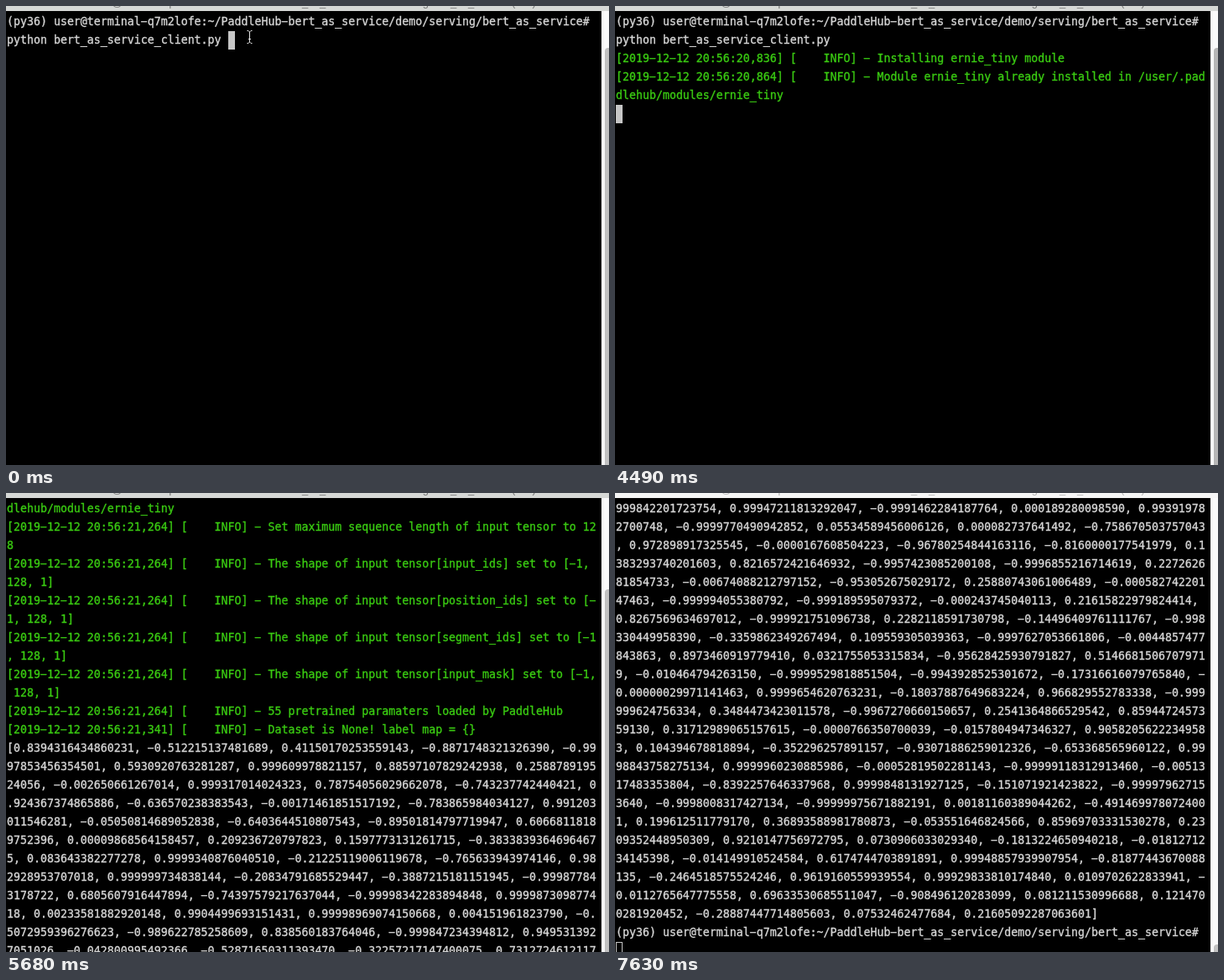
An HTML page that plays this animation: 719 px wide and 548 px high, repeating every 7.73 s.

```html
<!DOCTYPE html>
<html lang="en">
<head>
<meta charset="utf-8">
<title>Terminal session</title>
<style>
html, body { margin: 0; width: 100%; height: 100%; overflow: hidden; background: #000; }
#stage { position: absolute; left: 0; top: 0; width: 719px; height: 548px; overflow: hidden; background: #000; }
#stage > * { position: absolute; }
#view { left: 1px; top: 8px; width: 709px; height: 540px; overflow: hidden; }
pre {
  position: absolute; left: 0; top: 0; margin: 0; overflow: hidden; color: #d6d6d6;
  font: 13.289px/22px "DejaVu Sans Mono", "Liberation Mono", monospace;
  -webkit-text-stroke: .35px currentColor; font-variant-ligatures: none;
}
pre b { font-weight: normal; color: #3acb12; }
#cursor { width: 8px; height: 22px; box-sizing: border-box; background: #c6c6c6; border: 1px solid #c6c6c6; }
#cursor.hollow { background: none; }
#bar { left: 0; top: 0; width: 719px; height: 6px; overflow: hidden; background: #d6d8d6; color: #777; }
#bar.idle { background: #f6f6f6; color: #b5b5b5; }
#bar span { position: absolute; left: 101px; top: -12px; white-space: pre; font: 13px/15px "Liberation Sans", Arial, sans-serif; }
#track { left: 710px; top: 6px; width: 9px; height: 542px; background: #fafafa; }
#thumb { left: 714px; width: 8px; height: 560px; border-radius: 4px; background: #c1c1c1; }
#beam, #arrow { left: 0; top: 0; overflow: visible; }
</style>
</head>
<body>
<div id="stage">
  <div id="view">
<pre id="start">
(py36) user@terminal-q7m2lofe:~/PaddleHub-bert_as_service/demo/serving/bert_as_service#
python bert_as_service_client.py
<b id="log"></b>
</pre>
<pre id="end"></pre>
  </div>
  <div id="cursor"></div>
  <div id="track"></div>
  <div id="thumb"></div>
  <div id="bar"><span>user@terminal-q7m2lofe: ~/PaddleHub-bert_as_service/demo/serving/bert_as_service (ssh)</span></div>
  <svg id="beam" width="7" height="16" fill="none" stroke="#e4e4e4" stroke-width="1">
    <path d="M.5.5H2L3.5 2 5 .5H6.5M3.5 2V14M.5 15.5H2L3.5 14 5 15.5H6.5M2 10.5H5"/>
  </svg>
  <svg id="arrow" width="13" height="19">
    <path d="M.5 1V16L4 12.7 6.4 18.3 9 17.2 6.6 11.7H11.5Z" fill="#000" stroke="#fff"/>
  </svg>
</div>
<script>
const LOOP = 7730, ROW = 22, COL = 8, COLUMNS = 88;
const $ = id => document.getElementById(id);

const wrap = text => text.match(new RegExp(`.{1,${COLUMNS}}`, "g")).join("\n");
// The terminal face has wide dashes.
const widen = text => text.replace(/-/g, "\u2212");

function seeded(seed) {
  return () => {
    seed = (seed + 0x6d2b79f5) | 0;
    let n = Math.imul(seed ^ (seed >>> 15), 1 | seed);
    n = (n + Math.imul(n ^ (n >>> 7), 61 | n)) ^ n;
    return ((n ^ (n >>> 14)) >>> 0) / 2 ** 32;
  };
}

// Embedding values pile up near zero and near plus or minus one.
function embedding(count, seed) {
  const random = seeded(seed);
  return Array.from({ length: count }, () => {
    const u = 2 * random() - 1;
    return Math.tanh(8 * u ** 3).toFixed(15 + Math.floor(random() * 3));
  }).join(", ");
}

function logText() {
  const info = (time, text) => wrap(`[2019-12-12 20:56:${time}] [    INFO] - ${text}`);
  const shape = name => info("21,264", `The shape of input tensor[${name}] set to [-1, 128, 1]`);
  return [
    info("20,836", "Installing ernie_tiny module"),
    info("20,864", "Module ernie_tiny already installed in /user/.paddlehub/modules/ernie_tiny"),
    info("21,264", "Set maximum sequence length of input tensor to 128"),
    ...["input_ids", "position_ids", "segment_ids", "input_mask"].map(shape),
    info("21,264", "55 pretrained paramaters loaded by PaddleHub"),
    info("21,341", "Dataset is None! label map = {}")
  ].join("\n");
}

function fillPages() {
  const [prompt, command] = $("start").textContent.trim().split("\n");
  const head = "[0.8394316434860231, -0.512215137481689, " + embedding(70, 5);
  const tail = embedding(140, 12) + ", -0.28887447714805603, 0.07532462477684, 0.21605092287063601]";
  const tailSize = 23 * COLUMNS + 72;
  const log = $("log");
  log.textContent = widen(logText());
  $("start").replaceChildren(widen(prompt + "\n" + command + "\n"), log, "\n" + widen(wrap(head)));
  $("end").textContent = widen(wrap(tail.slice(-tailSize)) + "\n" + prompt);
}

// Each step overrides only what changes at time t (ms).
const steps = [
  { t: 0, page: "start", from: 0, lines: 2, col: 33, row: 1, thumb: 50, tone: "#c1c1c1", beam: [287, 29], arrow: null, idle: false },
  { t: 900, col: 0, row: 2 },
  { t: 3590, beam: [292, 29] },
  { t: 3740, beam: [454, 41] },
  { t: 3890, beam: null, arrow: [709, 202] },
  { t: 4040, arrow: null },
  { t: 4490, lines: 5, row: 5, tone: "#b6b6b6" },
  { t: 4640, tone: "#c1c1c1" },
  { t: 4940, lines: 17, row: 17 },
  { t: 5680, from: 4, lines: 29, row: 25, thumb: 115 },
  { t: 5830, page: "end", from: 0, lines: 24, row: 24, thumb: 539 },
  { t: 5980, from: 1, lines: 25 },
  { t: 7630, idle: true }
];
for (let i = 1; i < steps.length; i++) steps[i] = { ...steps[i - 1], ...steps[i] };

function place(el, pos) {
  el.style.display = pos ? "block" : "none";
  if (pos) el.style.transform = `translate(${pos[0]}px, ${pos[1]}px)`;
}

function show(s) {
  for (const id of ["start", "end"]) $(id).style.display = id === s.page ? "block" : "none";
  const page = $(s.page);
  page.style.height = s.lines * ROW + "px";
  page.style.top = -s.from * ROW + "px";
  place($("cursor"), [1 + s.col * COL, 8 + s.row * ROW]);
  $("cursor").className = s.idle ? "hollow" : "";
  $("bar").className = s.idle ? "idle" : "";
  $("thumb").style.top = s.thumb + "px";
  $("thumb").style.background = s.tone;
  place($("beam"), s.beam);
  place($("arrow"), s.arrow);
}

let current = null;
const begin = performance.now();
function tick() {
  const t = (performance.now() - begin) % LOOP;
  const step = steps.findLast(s => s.t <= t);
  if (step !== current) show(current = step);
  requestAnimationFrame(tick);
}
fillPages();
tick();
</script>
</body>
</html>
```
